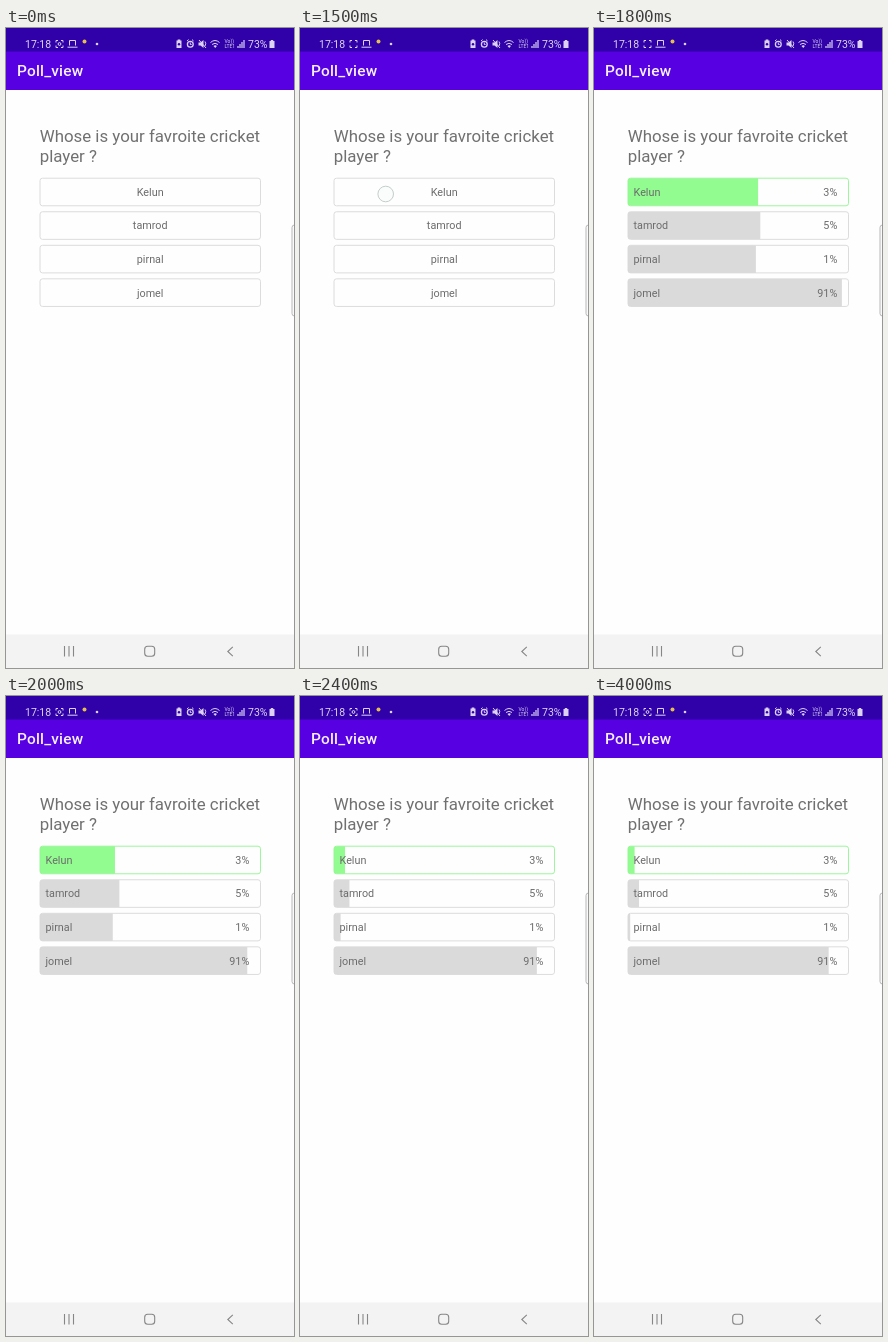
Animation of 288x640 px, one loop 4.4 s. Source, as an HTML page:

```html
<!DOCTYPE html>
<html lang="en">
<head>
<meta charset="utf-8">
<title>Poll</title>
<style>
  html, body { margin: 0; width: 100%; height: 100%; overflow: hidden; background: #fefefe; }
  svg { display: block; width: 288px; height: 640px; font-family: Roboto, sans-serif; }
  .line { fill: none; stroke: currentColor; }
  .status { color: #dcd2f6; fill: #dcd2f6; font-size: 10.5px; }
  .question { fill: #707070; font-size: 16.85px; }
  .row { fill: #6c6c6c; font-size: 10.8px; }
  .nav { color: #868686; stroke-width: 1.1; }
</style>
</head>
<body>
<svg id="stage" viewBox="0 0 288 640">
  <rect width="288" height="640" fill="#fefefe"/>
  <rect width="288" height="62" fill="#5700e1"/>
  <rect width="288" height="23.5" fill="#3000a8"/>
  <text x="11" y="48.3" fill="#f4effd" font-size="15.4" font-weight="500" letter-spacing=".19">Poll_view</text>

  <g class="status">
    <text x="19" y="19.6">17:18</text>
    <path class="line" d="M52 12.5h-2v2M55 12.5h2v2M52 19.5h-2v-2M55 19.5h2v-2"/>
    <circle id="record" class="line" cx="53.5" cy="16" r="1.4"/>
    <path class="line" d="M63.5 17.5v-5h6v5M61.5 19.2h10"/>
    <circle cx="78.5" cy="13.5" r="2" fill="#e2c04a"/>
    <circle cx="91" cy="16" r="1.3"/>
    <path d="M170.5 12.5h1.2v-1h2.6v1h1.2v7.5h-5z"/>
    <circle cx="173" cy="16.3" r="1.2" fill="#3000a8"/>
    <circle class="line" cx="184.3" cy="16.2" r="2.9" stroke-width="1.3"/>
    <path class="line" d="M184.3 14.5v2h1.3M181 13l1.6-1.4M187.6 13l-1.6-1.4"/>
    <path d="M192.5 14.5h2l3-2.5v8l-3-2.5h-2z"/>
    <path class="line" d="M193 12l7 8M199 13.5q1.5 2 0 4.5"/>
    <path class="line" d="M204.5 14.5q4.5-4 9 0M206 16.5q3-2.5 6 0"/>
    <path d="M207.5 18q1.7-1.4 3.4 0l-1.7 2z"/>
    <text x="218.5" y="15.3" font-size="5">Vo))</text>
    <text x="218.5" y="20" font-size="5">LTE1</text>
    <path class="line" d="M232 18v2M234 16v4M236 14v6M238 12v8" stroke-width="1.2"/>
    <text x="242" y="19.6">73%</text>
    <path d="M263.5 13h1.3v-1h2.4v1h1.3v7h-5z"/>
  </g>

  <g class="question">
    <text x="33.7" y="113.7">Whose is your favroite cricket</text>
    <text x="33.7" y="133.8">player ?</text>
  </g>
  <g id="poll" class="row"></g>
  <circle id="touch" cx="85.7" cy="166" r="7.8"/>
  <rect x="286" y="197" width="8" height="91" rx="2.5" fill="#fafafa" stroke="#b8b8b8"/>

  <rect y="606.5" width="288" height="34" fill="#f3f3f3"/>
  <g class="nav">
    <path class="line" d="M58.5 618v10.5M63 618v10.5M67.5 618v10.5"/>
    <rect class="line" x="138.7" y="618.3" width="10" height="10" rx="3"/>
    <path class="line" d="M226.8 618.8l-5 4.7 5 4.7"/>
  </g>
</svg>
<script>
const LOOP = 4400, STEP = 100;
const TOUCH = 1400, REVEAL = 1600, TOUCH_END = 1700;
const LEFT = 34, WIDTH = 220.5, HEIGHT = 27.6, TOP = 150.2, PITCH = 33.55;
const OPTIONS = [["Kelun", 3], ["tamrod", 5], ["pirnal", 1], ["jomel", 91]];
// Animation progress at given times; uneven because of dropped frames.
const PROGRESS = [[1600, .05], [2000, .436], [2400, .87], [2500, 1]];

const byId = id => document.getElementById(id);

function add(parent, tag, attributes, text = "") {
  const node = document.createElementNS("http://www.w3.org/2000/svg", tag);
  setAll(node, attributes);
  node.textContent = text;
  return parent.appendChild(node);
}

function setAll(node, attributes) {
  for (const name in attributes) node.setAttribute(name, attributes[name]);
}

const rows = OPTIONS.map(([name, percent], i) => {
  const poll = byId("poll"), y = TOP + i * PITCH, baseline = y + 17.7;
  const box = { x: LEFT, y, width: WIDTH, height: HEIGHT, rx: 2.5 };
  add(add(poll, "clipPath", { id: "clip" + i }), "rect", box);
  const bar = add(poll, "rect", { ...box, rx: 0, fill: i ? "#dadada" : "#92fc91", "clip-path": `url(#clip${i})` });
  const border = add(poll, "rect", { ...box, fill: "none", "stroke-width": .9 });
  const label = add(poll, "text", { y: baseline }, name);
  const value = add(poll, "text", { x: 243.3, y: baseline, "text-anchor": "end" }, percent + "%");
  return { percent, bar, border, label, value };
});

function progressAt(time) {
  const next = PROGRESS.findIndex(([t]) => t > time);
  if (next < 0) return 1;
  if (next === 0) return 0;
  const [t0, p0] = PROGRESS[next - 1], [t1, p1] = PROGRESS[next];
  return p0 + (p1 - p0) * (time - t0) / (t1 - t0);
}

function draw(time) {
  const voted = time >= REVEAL;
  const eased = 1 - (1 - progressAt(time)) ** 2;

  rows.forEach(({ percent, bar, border, label, value }, i) => {
    const shown = 100 - Math.floor(eased * (100 - percent));
    bar.setAttribute("width", voted ? WIDTH * shown / 100 : 0);
    border.setAttribute("stroke", voted && i === 0 ? "#92f592" : "#d9d9d9");
    setAll(label, voted ? { x: 39.5, "text-anchor": "start" } : { x: 144.2, "text-anchor": "middle" });
    value.setAttribute("visibility", voted ? "visible" : "hidden");
  });

  setAll(byId("touch"), {
    visibility: time >= TOUCH && time < TOUCH_END ? "visible" : "hidden",
    fill: voted ? "#c4f5c0" : "#fafcfb",
    "fill-opacity": voted ? .5 : .8,
    stroke: voted ? "#a9e6a6" : "#c3cecb",
    r: voted ? 6.8 : 7.8
  });
  byId("record").setAttribute("visibility", Math.floor(time / 1000) % 2 ? "hidden" : "visible");
}

function tick() {
  const time = performance.now() % LOOP;
  draw(Math.floor(time / STEP) * STEP);
  requestAnimationFrame(tick);
}
tick();
</script>
</body>
</html>
```
